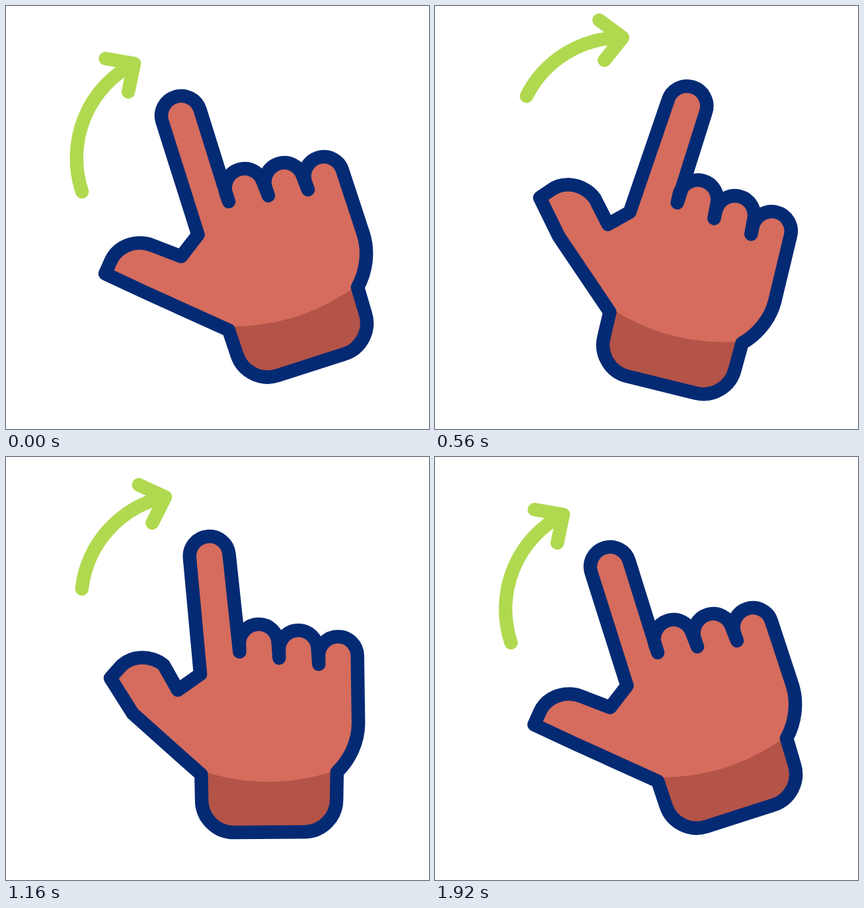
These frames come from a looping animation (640 px wide and 640 px high, 2000 ms). An HTML page:

```html
<!DOCTYPE html>
<html lang="en">
<head>
<meta charset="utf-8">
<title>Swiping hand</title>
<style>
html, body { margin: 0; width: 100%; height: 100%; overflow: hidden; background: #fff; }
svg { display: block; width: 100%; height: 100%; }
path { stroke-linecap: round; stroke-linejoin: round; }
</style>
</head>
<body>
<svg viewBox="0 0 640 640">
  <path id="arrow" fill="none" stroke="#b0d94f" stroke-width="20.5"/>
  <g id="hand">
    <path id="skin" fill="#d56c5d"/>
    <path id="cuff" fill="#b45348"/>
    <path id="outline" fill="none" stroke="#042a74" stroke-width="20.5"/>
  </g>
</svg>
<script>
const LOOP = 2000, STEP = 40, SWING = 33;
const $ = id => document.getElementById(id);
const rad = deg => deg * Math.PI / 180;

// Eased 0 to 1 between two times
function ease(t, from, to) {
  const s = Math.min(1, Math.max(0, (t - from) / (to - from)));
  return (1 - Math.cos(Math.PI * s)) / 2;
}

// Rises from a to b, falls from c to d
const pulse = (t, a, b, c, d) => ease(t, a, b) - ease(t, c, d);

// Two swings per loop, the second one slower; thumb and index finger follow through
const swing = t => pulse(t, 90, 500, 510, 900) + pulse(t, 850, 1450, 1450, 1860);
const thumb = t => pulse(t, 90, 290, 240, 860) + pulse(t, 880, 1180, 1130, 1760);
const bend = t =>
  2.8 * (pulse(t, 270, 560, 560, 880) + pulse(t, 1150, 1480, 1480, 1890))
  - 5.6 * (pulse(t, 90, 260, 270, 560) + pulse(t, 870, 1140, 1150, 1480));

function turn(x, y, deg, cx, cy) {
  const c = Math.cos(rad(deg)), s = Math.sin(rad(deg));
  return [cx + (x - cx) * c - (y - cy) * s, cy + (x - cx) * s + (y - cy) * c];
}

const knuckle = 'l-4 -11.5a29 29 0 0 1 56 -18';
const wrist = 'L543.6 464.9A49 49 0 0 1 512.1 526.6L411.1 559.1A49 49 0 0 1 349.4 527.6Z';

function handPath(flex, angle) {
  const th = (x, y) => [x + 12.5 * flex, y - 13 * flex];
  const tip = (x, y) => turn(x, y, angle, 314, 320);
  const base = 290.5 - 2.6 * Math.max(0, angle);
  return `M337 490.5L211 433.5L${th(150, 405)}L${th(158, 387)}
    C${th(166, 368)} ${th(184, 358.5)} ${th(203, 358.5)}
    Q${th(212, 358.5)} ${th(221, 362)}L265 379L${base} 346
    L${tip(236.4, 175)}A29 29 0 0 1 ${tip(293.6, 157)}L337 296
    ${[knuckle, knuckle, knuckle].join('l8 20.5')}L541 346
    C549 372 545 402 532 425.5${wrist}`;
}

function arrowPath(p) {
  const [cx, cy] = [268, 231], shrink = 1 - .028 * Math.sin(Math.PI * p);
  const tail = turn(cx - 153 * shrink, cy + 50 * shrink, 56.5 * p, cx, cy);
  const x = 194 + 84 * p + 10 * p * p, y = 87 - 62 * p + 22 * p * p;
  const wing = (dx, dy) => turn(x + dx, y + dy, 28 * p, x, y);
  return `M${tail}A161 161 0 0 1 ${x} ${y}M${wing(-43.5, -7.5)}L${x} ${y}L${wing(-9, 43)}`;
}

function draw() {
  const t = Math.floor(performance.now() % LOOP / STEP) * STEP;
  const p = swing(t), d = handPath(thumb(t), bend(t));
  $('skin').setAttribute('d', d);
  $('outline').setAttribute('d', d);
  $('hand').setAttribute('transform', `rotate(${SWING * p} 349 349)`);
  $('arrow').setAttribute('d', arrowPath(p));
  requestAnimationFrame(draw);
}

$('cuff').setAttribute('d', 'M337 485Q446 486 532 422' + wrist);
draw();
</script>
</body>
</html>
```
